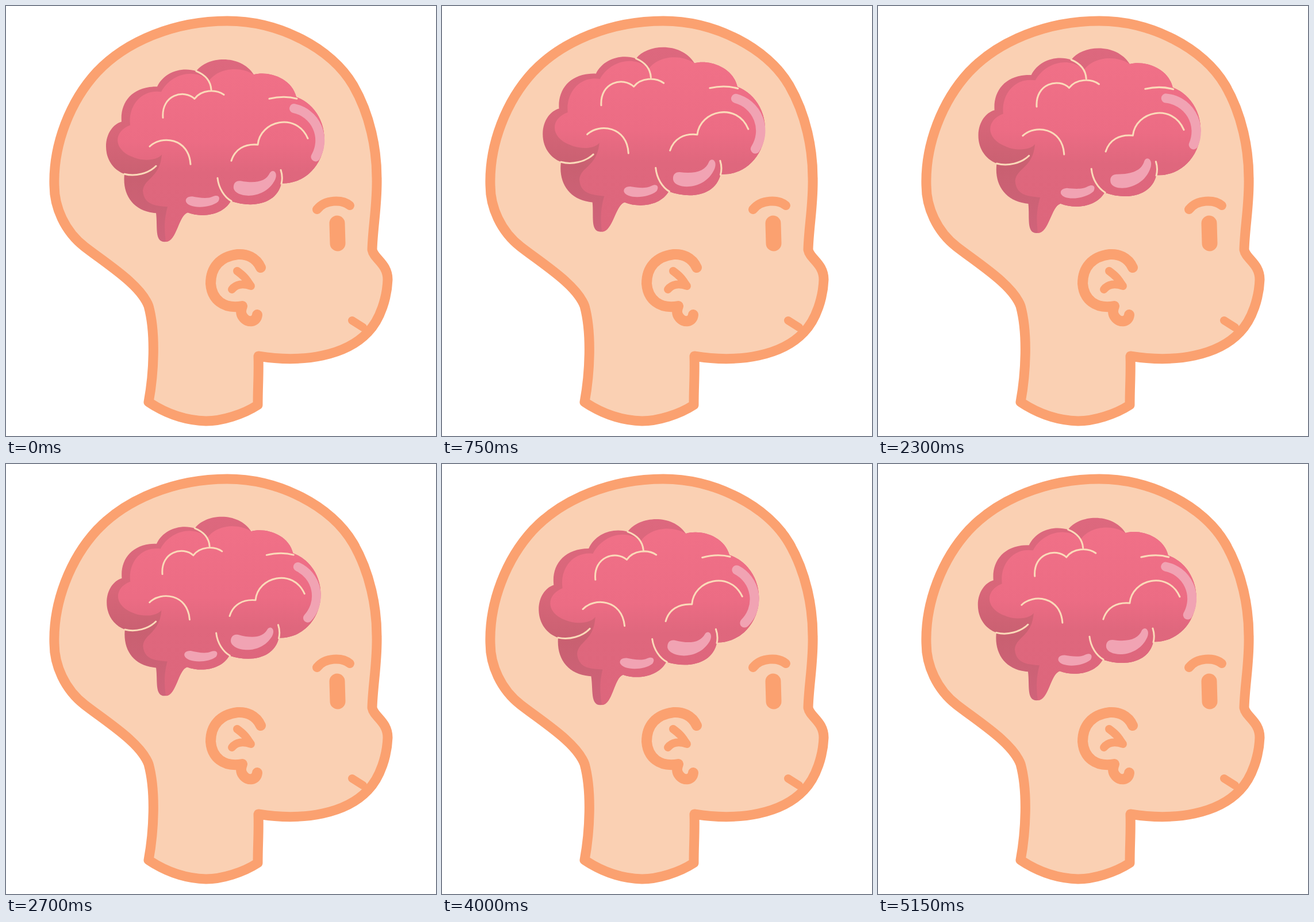
Write an HTML page that moves like this. It is 748 by 748 pixels and loops after 5200 ms.

```html
<!DOCTYPE html>
<html lang="en">
<head>
<meta charset="utf-8">
<title>Brain in a head</title>
<style>
html, body { margin: 0; width: 100%; height: 100%; overflow: hidden; background: #fff; }
svg { display: block; width: 100vw; height: 100vh; }
.ink, .crease { fill: none; stroke-linecap: round; stroke-linejoin: round; }
.ink { stroke: #fba170; stroke-width: 16; }
.crease { stroke: #fbdab9; stroke-width: 3; }
.shine { fill: #f1a3b3; }
</style>
</head>
<body>
<svg viewBox="0 0 748 748">
  <defs>
    <linearGradient id="light" gradientUnits="userSpaceOnUse" x1="0" y1="94" x2="0" y2="411">
      <stop offset="0" stop-color="#f17188"/>
      <stop offset=".45" stop-color="#ec6c84"/>
      <stop offset=".62" stop-color="#df677d"/>
      <stop offset="1" stop-color="#dd667c"/>
    </linearGradient>
    <linearGradient id="shade" gradientUnits="userSpaceOnUse" x1="0" y1="94" x2="0" y2="411">
      <stop offset="0" stop-color="#dd687e"/>
      <stop offset=".4" stop-color="#d86679"/>
      <stop offset=".65" stop-color="#c96071"/>
      <stop offset="1" stop-color="#d0637a"/>
    </linearGradient>
  </defs>

  <path fill="#fad0b3" stroke="#fba170" stroke-width="17" stroke-linejoin="round" d="M385 26
    C475 26 566 73 604 138 C634 190 645 250 645 300 C646 345 638 385 637 424
    C640 440 664 448 664 476 C663 505 652 545 629 568 C592 607 520 622 439 609
    C440 640 438 660 438 694 C412 711 375 722 348 722 C310 721 275 707 248 689
    C257 640 261 570 248 522 C234 485 177 450 137 419 C102 392 84 350 84 312
    C82 240 112 165 158 115 C210 60 295 26 385 26Z"/>
  <g class="ink">
    <path d="M541 354C555 336 585 336 598 347"/>
    <path d="M576 378L577 413" stroke-width="27"/>
    <path stroke-width="18" d="M443 455C435 437 418 431 403 432C372 436 356 455 356 483C358 510 378 528 411 522C408 530 408 536 413 542C421 552 436 550 437 537"/>
    <path stroke-width="14" d="M402 461C417 472 418 476 426 487C412 482 400 484 393 493"/>
    <path stroke-width="14" d="M602 547L621 559"/>
  </g>

  <g id="brain">
    <path fill="url(#shade)" d="M174 245C174 222 187 206 201 202C198 168 220 140 263 141
      C275 116 305 106 331 114C350 88 408 84 431 120C455 113 497 125 505 159
      A71 77 0 0 1 479 309C472 343 432 354 391 340
      C378 364 342 370 316 360C300 365 297 411 276 411C258 411 264 385 261 361
      C222 358 202 330 206 293C187 286 174 268 174 245Z"/>
    <path fill="url(#light)" d="M352 133C365 110 405 103 431 120C455 113 497 125 505 159
      A71 77 0 0 1 479 309C472 343 432 354 391 340
      C378 364 342 370 316 360C300 365 297 411 278 411C276 395 274 375 281 350
      C262 348 240 348 238 322C240 300 268 300 271 259C262 271 235 270 222 264
      C187 252 185 220 216 208C212 175 235 145 270 150C285 122 320 110 345 125Z"/>
    <path class="crease" d="M331 114C348 121 356 132 357 146
      M273 195C270 155 310 145 328 162C340 146 365 145 379 155
      M458 162C475 158 492 158 506 162
      M392 270C398 250 415 240 438 242C442 200 505 185 525 231
      M250 245C270 225 318 230 321 276
      M206 293C225 298 248 292 261 279
      M368 300C370 318 380 333 392 340
      M478 286C481 295 481 302 479 310"/>
    <path id="front" fill="none" stroke="#f1a3b3" stroke-width="16" stroke-linecap="round" d="M502 179A57 57 0 0 1 538 264"/>
    <path id="middle" class="shine" d="M396 318C400 335 450 339 468 303C474 290 464 283 459 291
      C452 306 435 310 408 305C399 304 395 310 396 318Z"/>
    <path id="lower" class="shine" d="M313 341C318 354 355 353 369 341C374 333 369 328 360 332
      C350 337 335 334 324 332C315 332 312 336 313 341Z"/>
  </g>
</svg>
<script>
const LOOP = 5200, STEP = 50;
const { sin, cos, PI } = Math;
const el = id => document.getElementById(id);

// Two squashes, each followed by a quick stretch: [time, scale].
const pulse = [
  [0, 1], [550, .966], [750, 1.018], [1600, 1.043], [2300, 1.018],
  [2800, .971], [3200, .973], [3700, 1.028], [4000, 1.01], [LOOP, 1]
];

function scaleAt(t) {
  const i = pulse.findIndex(([time]) => time > t);
  const [t0, s0] = pulse[i - 1], [t1, s1] = pulse[i];
  return s0 + (s1 - s0) * (t - t0) / (t1 - t0);
}

const turn = (id, angle, x, y) => el(id).setAttribute('transform', `rotate(${angle} ${x} ${y})`);

function draw(now) {
  const t = Math.floor(now % LOOP / STEP) * STEP;
  const w = 2 * PI * t / LOOP;

  // The stem floats up and down while the brain rocks about it.
  const y = 403.8 - 17 * sin(w) + 4.5 * cos(w) + 2 * cos(2 * w);
  const tilt = 1.7 * sin(w) - .3 * sin(2 * w);
  el('brain').setAttribute('transform',
    `translate(276 ${y}) rotate(${tilt}) scale(${scaleAt(t)}) translate(-276 -411)`);

  // Shines slide around their lobes.
  const wobble = 11 * sin(4 * w);
  turn('front', 3 - 17 * sin(w) - 4 * cos(w) + 14 * sin(2 * w), 488, 234);
  turn('middle', wobble, 428, 292);
  turn('lower', wobble / 2, 340, 305);
}

const start = performance.now();
function tick() {
  draw(performance.now() - start);
  requestAnimationFrame(tick);
}
tick();
</script>
</body>
</html>
```
